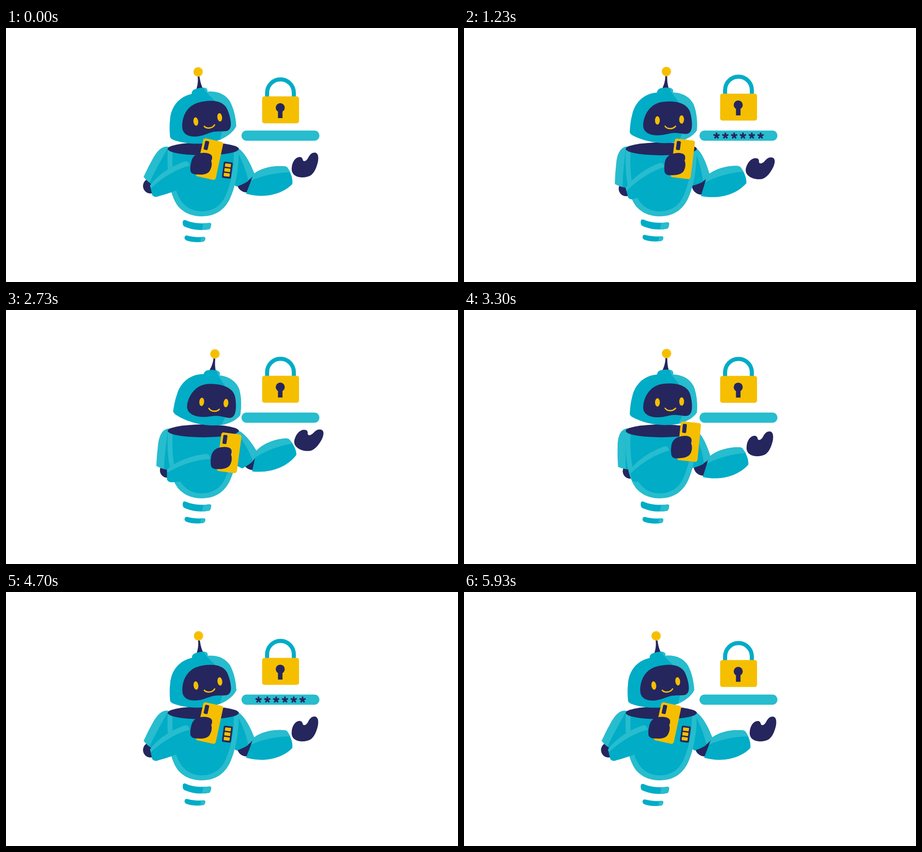
These frames come from a looping animation (998 by 561 pixels, 6.01 s). An HTML page:

```html
<!DOCTYPE html>
<html lang="en">
<head>
<meta charset="utf-8">
<title>Robot with padlock and password</title>
<style>
  html, body { margin: 0; width: 100%; height: 100%; overflow: hidden; background: #fff; }
  svg { display: block; width: 100%; height: 100%; }
  .teal { fill: #00acc6; }
  .light { fill: #27bcce; }
  .navy { fill: #25265e; }
  .gold { fill: #f5bf00; }
</style>
</head>
<body>
<svg viewBox="0 0 998 561">
  <defs>
    <path id="shell" d="M426 142.500C427 136 431 133 438 132.500C445 131 454 131 459 134C462 136 462 139 461 142.500C483 143 499 153 507 169C514 187 515.500 207 514 226C508 236 493 246 475 251C440 258.500 400 252.500 371 236.500Q366 233 366 229C367 214 368 204 371 193C376 167 395 145 426 142.500Z"/>
    <path id="ringTop" d="M390.500 427Q392 422.500 397 424.500C412 431.500 430 432.500 449 430.500Q454 430.500 453 435Q452 441 450 444C430 449 408 445 393 438Q389 434 390.500 427Z"/>
    <path id="ringLow" d="M394.500 461.500Q396 457.500 400 458.500C412 461.500 424 462.500 436 461.500Q441 461.500 440 466Q439 471 435 472C422 474 408 473 398 469Q393 466 394.500 461.500Z"/>
    <clipPath id="inShell"><use href="#shell"/></clipPath>
    <clipPath id="inTop"><use href="#ringTop"/></clipPath>
    <clipPath id="inLow"><use href="#ringLow"/></clipPath>
  </defs>

  <g id="springTop">
    <use href="#ringTop" class="teal"/>
    <path class="light" clip-path="url(#inTop)" d="M436 420Q436 438 431 450H460V420Z"/>
  </g>
  <g id="springLow">
    <use href="#ringLow" class="teal"/>
    <path class="light" clip-path="url(#inLow)" d="M431 455Q431 465 428 478H450V455Z"/>
  </g>

  <circle id="elbowL" class="navy" r="16.500"/>
  <g id="sleeveL">
    <path class="light" d="M368 262C349 259 340 271 336.500 295Q333.500 320 333 344.500Q344 351 359 353L390 335V264Z"/>
    <path class="teal" d="M357 266C355 290 351 318 350 351L360 353L400 340L385 270Z"/>
  </g>

  <circle id="elbowR" class="navy" r="21"/>
  <g id="sleeveR">
    <path class="light" d="M505 262C524 267 539 297 549 323Q535 341 509 350L495 340V270Z"/>
    <path class="teal" d="M510 270C519 290 530 312 535 338Q525 345 509 350L495 340Z"/>
  </g>
  <g id="foreR">
    <path class="teal" d="M530 366L547 322C565 308 593 303 616 305.500Q620 306 622 309C627 317 631 326 632 334Q633 341 632 345C609 368 570 377 530 366Z"/>
    <path class="light" d="M541 337L547 322C565 308 593 303 616 305.500Q620 306 622 309L628 319C597 319 566 326 541 337Z"/>
  </g>
  <path id="handR" class="navy" d="M631 308C632 295 640 284 650 285C655 286 655 291 656 293C660 296 664 292 667 287C671 279 676 274 684 275.500C690 278 690 287 689 294C686 308 681 320 672 326C660 332 645 331 637 325C632 321 630 315 631 308Z"/>

  <path class="light" d="M357 267C355 320 360 368 380 394C395 411 415 416 432 416C462 416 482 402 494 378C508 348 514 310 514 267Z"/>
  <path class="teal" d="M368 267C366 320 369 360 390 386C402 400 418 405 432 405C456 405 474 393 484 372C497 342 504 310 503 267Z"/>
  <ellipse class="navy" cx="435.500" cy="267" rx="78.500" ry="14.200"/>
  <g transform="translate(488.700 314) rotate(7.500)">
    <rect class="navy" x="-10" y="-18" width="20" height="36" rx="3"/>
    <g class="gold">
      <rect x="-6.500" y="-14.500" width="13" height="7.500" rx="1"/>
      <rect x="-6.500" y="-4" width="13" height="7.500" rx="1"/>
      <rect x="-6.500" y="6.500" width="13" height="7.500" rx="1"/>
    </g>
  </g>

  <g id="head">
    <path class="navy" d="M444.500 105C444.500 117 441.500 126 437.500 134H452.500C449.500 126 448.500 117 448.500 105Z"/>
    <circle cx="447" cy="96" r="10.500" fill="#f8c929"/>
    <circle class="gold" cx="446" cy="96" r="9"/>
    <use href="#shell" class="teal"/>
    <path class="light" clip-path="url(#inShell)" d="M452 128C458 152 488 168 488 200C488 220 480 238 472 256H525V128Z"/>
    <path class="navy" d="M395.500 214C397 190 412 166 440 163C468 160 492 166 499 185C503 198 504 212 503 219C502 229 497 234 490 234C482 234 470 231 460 232C447 234 440 237 428 237C408 237 395 229 395.500 214Z"/>
    <ellipse class="gold" cx="427" cy="204" rx="5.300" ry="9.300"/>
    <ellipse class="gold" cx="480.500" cy="202" rx="5.300" ry="9.300"/>
    <path d="M444 217C449 224 461 224 467 217" fill="none" stroke="#f5bf00" stroke-width="3" stroke-linecap="round"/>
  </g>

  <g id="foreL">
    <path class="teal" d="M0 0C25 -13 65 -15 94 -9Q101 -6 99 4L104 34C80 42 45 40 6 30Q-4 29 -6 21Z"/>
    <path class="light" d="M0 0C25 -13 65 -15 94 -9Q101 -6 98 4C70 -3 35 -3 -1 6Z"/>
  </g>
  <g id="handL">
    <g transform="translate(482.800 289) rotate(7.200)">
      <rect class="gold" x="-22.500" y="-43" width="45" height="86" rx="5"/>
      <rect class="navy" x="-17.500" y="-38" width="9" height="20" rx="2.500"/>
    </g>
    <path class="navy" d="M443 300C444 287 452 279 464 277C474 275 486 276 488 283C489 287 488 291 487 293C490 299 489 308 486 314C483 321 474 325 462 325C452 326 445 325 443 318C442 312 442 306 443 300Z"/>
  </g>

  <g id="lock">
    <path d="M576.500 153V143A29.500 29.500 0 0 1 635.500 143V153" fill="none" stroke="#00acc6" stroke-width="9"/>
    <rect class="gold" x="565.500" y="151" width="81.500" height="59.500" rx="5"/>
    <circle class="navy" cx="605.500" cy="176" r="10"/>
    <rect class="navy" x="600.500" y="180" width="10" height="19"/>
  </g>
  <rect class="light" x="520" y="226.500" width="172" height="22.500" rx="11.250"/>
  <g id="stars" stroke="#25265e" stroke-width="3.600"></g>
</svg>

<script>
const LOOP = 6010;
const $ = id => document.getElementById(id);
const clamp = v => Math.max(0, Math.min(1, v));
const ease = p => p * p * (3 - 2 * p);

const place = (id, x, y, angle = 0, px = 0, py = 0) =>
  $(id).setAttribute('transform', `translate(${x - px} ${y - py}) rotate(${angle} ${px} ${py})`);

// Each part eases through its poses; spans hold [start, end] of each move.
const parts = {
  head: {
    poses: [[-7.8], [0], [5.1], [0]],
    spans: [[40, 640], [1340, 1940], [2660, 3360], [4233, 4764]]
  },
  // elbow x, y, forearm angle, hand x, y, angle, sleeve angle
  left: {
    poses: [
      [318, 348, -29, 431.5, 300, 5, 23],
      [357, 354, -31, 466, 301, 0, 0],
      [355, 353, -16, 475.5, 328, 0.5, 1],
      [366, 355, -29.5, 480.5, 303, -1.5, -5]
    ],
    spans: [[40, 640], [1340, 2040], [2660, 3330], [4233, 4570]]
  },
  // forearm x, y, angle, hand x, y, angle, sleeve angle
  right: {
    poses: [
      [530, 366, 0, 660, 303, 0, 0],
      [523, 371, -4, 653, 308, 14, 6],
      [544, 356, -9, 668, 285, 16, -9],
      [527, 369, -3.5, 653, 296, 0, 4.3]
    ],
    spans: [[40, 840], [1340, 1940], [2660, 3330], [4233, 4740]]
  }
};

function poseAt({ poses, spans }, t) {
  let pose = poses[0];
  spans.forEach(([start, end], i) => {
    const k = ease(clamp((t - start) / (end - start)));
    const next = poses[(i + 1) % poses.length];
    pose = pose.map((v, j) => v + (next[j] - v) * k);
  });
  return pose;
}

// Five-armed password stars
const stars = Array.from({ length: 6 }, (_, i) => {
  const star = document.createElementNS('http://www.w3.org/2000/svg', 'path');
  let d = '';
  for (let arm = 0; arm < 5; arm++) {
    const a = arm * Math.PI * 2 / 5;
    d += `M0 0L${7 * Math.sin(a)} ${-7 * Math.cos(a)}`;
  }
  star.setAttribute('d', d);
  star.setAttribute('transform', `translate(${557.6 + 19.45 * i} 238)`);
  $('stars').append(star);
  return star;
});

// The stars appear and vanish one after another, twice per loop.
const FADE = 100, SHOW = 15, HIDE = 1635, REPEAT = 3675;
function starAlpha(i, t) {
  const local = t % REPEAT - i * FADE;
  return clamp((local - SHOW) / FADE) - clamp((local - HIDE) / FADE);
}

// Rise and fall, slightly rounded at the peak
function bob(t) {
  const p = t % 2000 / 2000;
  return (1 - Math.abs(2 * p - 1) + Math.sin(Math.PI * p)) / 2;
}

// The picture advances in alternating holds of 30 and 70 ms.
function stepTime(t) {
  const base = Math.floor(t / 100) * 100;
  return Math.min(5930, base + (t - base >= 30 ? 30 : 0));
}

function draw(t) {
  const [tilt] = poseAt(parts.head, t);
  place('head', 442, 263, tilt, 442, 263);

  const [ex, ey, fa, hx, hy, ha, sa] = poseAt(parts.left, t);
  place('elbowL', ex + 1, ey + 1);
  place('sleeveL', 357, 265, sa, 357, 265);
  place('foreL', ex, ey, fa);
  place('handL', hx, hy, ha, 466, 301);

  const [rx, ry, ra, gx, gy, ga, ua] = poseAt(parts.right, t);
  place('elbowR', rx + 1, ry - 24);
  place('sleeveR', 514, 268, ua, 514, 268);
  place('foreR', rx, ry, ra, 530, 366);
  place('handR', gx, gy, ga, 660, 303);

  const lift = bob(t);
  place('lock', 0, -7 * lift);
  place('springTop', 0, -1.4 * lift);
  place('springLow', 0, -1.7 * lift);

  stars.forEach((star, i) => star.setAttribute('opacity', starAlpha(i, t)));
}

const begin = performance.now();
function tick() {
  draw(stepTime((performance.now() - begin) % LOOP));
  requestAnimationFrame(tick);
}
tick();
</script>
</body>
</html>
```
